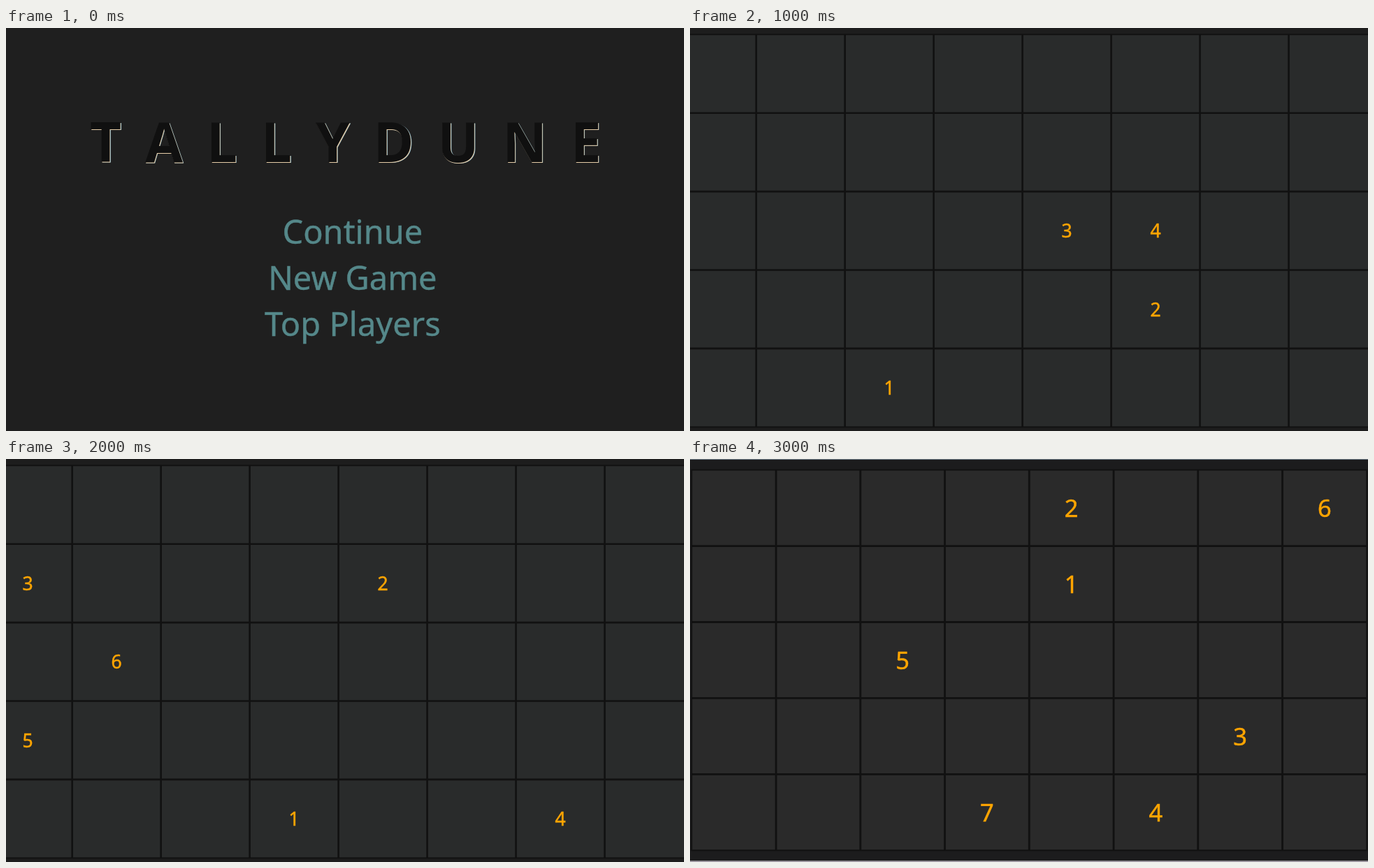
Animation, 970 px wide and 577 px high, one loop 4000 ms. Source, as an HTML page:

```html
<!DOCTYPE html>
<html lang="en">
<head>
<meta charset="utf-8">
<title>Memory game</title>
<style>
  html, body { margin: 0; width: 100%; height: 100%; overflow: hidden; background: #1f1f1f; }
  svg { display: block; width: 100vw; height: 100vh; }
  text { font-family: "Noto Sans", "Open Sans", sans-serif; }
  .title { font-size: 78px; font-weight: 700; letter-spacing: 34px; font-kerning: none; }
  .menu { font-size: 47px; fill: #55888a; stroke: #55888a; stroke-width: 0.4px; text-anchor: middle; }
  .digit { fill: #ffa500; stroke: #ffa500; stroke-width: 0.5px; text-anchor: middle; }
</style>
</head>
<body>
<svg id="stage" viewBox="0 0 970 577" preserveAspectRatio="none"></svg>
<script>
const NS = "http://www.w3.org/2000/svg";
const stage = document.getElementById("stage");
const SCENE_MS = 1000;

function add(parent, tag, attrs = {}, label) {
  const el = document.createElementNS(NS, tag);
  for (const key in attrs) el.setAttribute(key, attrs[key]);
  if (label !== undefined) el.textContent = label;
  parent.appendChild(el);
  return el;
}

const rect = (parent, x, y, width, height, fill) =>
  add(parent, "rect", { x, y, width, height, fill });

function menuScene() {
  const g = add(stage, "g");
  rect(g, 0, 0, 970, 577, "#1f1f1f");
  // Light rim below and to the right of the dark letters
  const layers = [[1.4, 0.7, "#86b4c8"], [0.8, 1.3, "#e6cda8"], [0, 0, "#101010"]];
  for (const [dx, dy, fill] of layers)
    add(g, "text", { class: "title", x: 120 + dx, y: 192 + dy, fill }, "TALLYDUNE");
  ["Continue", "New Game", "Top Players"].forEach((label, i) =>
    add(g, "text", { class: "menu", x: 495.9, y: 309 + 66 * i }, label));
  return g;
}

// Each digit is [label, column, row]
function boardScene(board, digits) {
  const { x, y, w, h, size, drop, cell, back, line } = board;
  const g = add(stage, "g");
  const stroke = "#111111";
  rect(g, 0, 0, 970, 577, back);
  rect(g, x, y, w * 8, h * 5, cell);
  let d = "";
  for (let c = 1; c < 8; c++) d += `M${x + c * w} ${y}v${h * 5}`;
  for (let r = 1; r < 5; r++) d += `M${x} ${y + r * h}h${w * 8}`;
  add(g, "path", { d, fill: "none", stroke, "stroke-width": line });
  add(g, "rect", {
    x, y, width: w * 8, height: h * 5, fill: "none", stroke, "stroke-width": line * 0.7
  });
  for (const [label, col, row] of digits)
    add(g, "text", {
      class: "digit", "font-size": size,
      x: x + (col + 0.5) * w, y: y + row * h + drop
    }, label);
  return g;
}

const near = {
  x: -32.3, y: 9.3, w: 126.98, h: 112.4, size: 26.5, drop: 66,
  cell: "#292b2b", back: "#1d1d1d", line: 2.6
};
const full = {
  x: 2.3, y: 15.6, w: 120.75, h: 108.95, size: 34.5, drop: 67.4,
  cell: "#2a2a2a", back: "#1c1c1d", line: 2.8
};

const scenes = [
  menuScene(),
  boardScene(near, [[1, 2, 4], [2, 5, 3], [3, 4, 2], [4, 5, 2]]),
  boardScene(near, [[1, 3, 4], [2, 4, 1], [3, 0, 1], [4, 6, 4], [5, 0, 3], [6, 1, 2]]),
  boardScene(full, [[1, 4, 1], [2, 4, 0], [3, 6, 3], [4, 5, 4], [5, 2, 2], [6, 7, 0], [7, 3, 4]])
];
rect(scenes[3], 0, 0, 970, 1, "#6f7d88");
rect(scenes[3], 0, 575, 970, 2, "#98929a");

function draw(ms) {
  const current = Math.floor(ms / SCENE_MS) % scenes.length;
  scenes.forEach((g, i) => g.setAttribute("display", i === current ? "inline" : "none"));
}

const start = performance.now();
function tick() {
  draw(performance.now() - start);
  requestAnimationFrame(tick);
}
tick();
</script>
</body>
</html>
```
